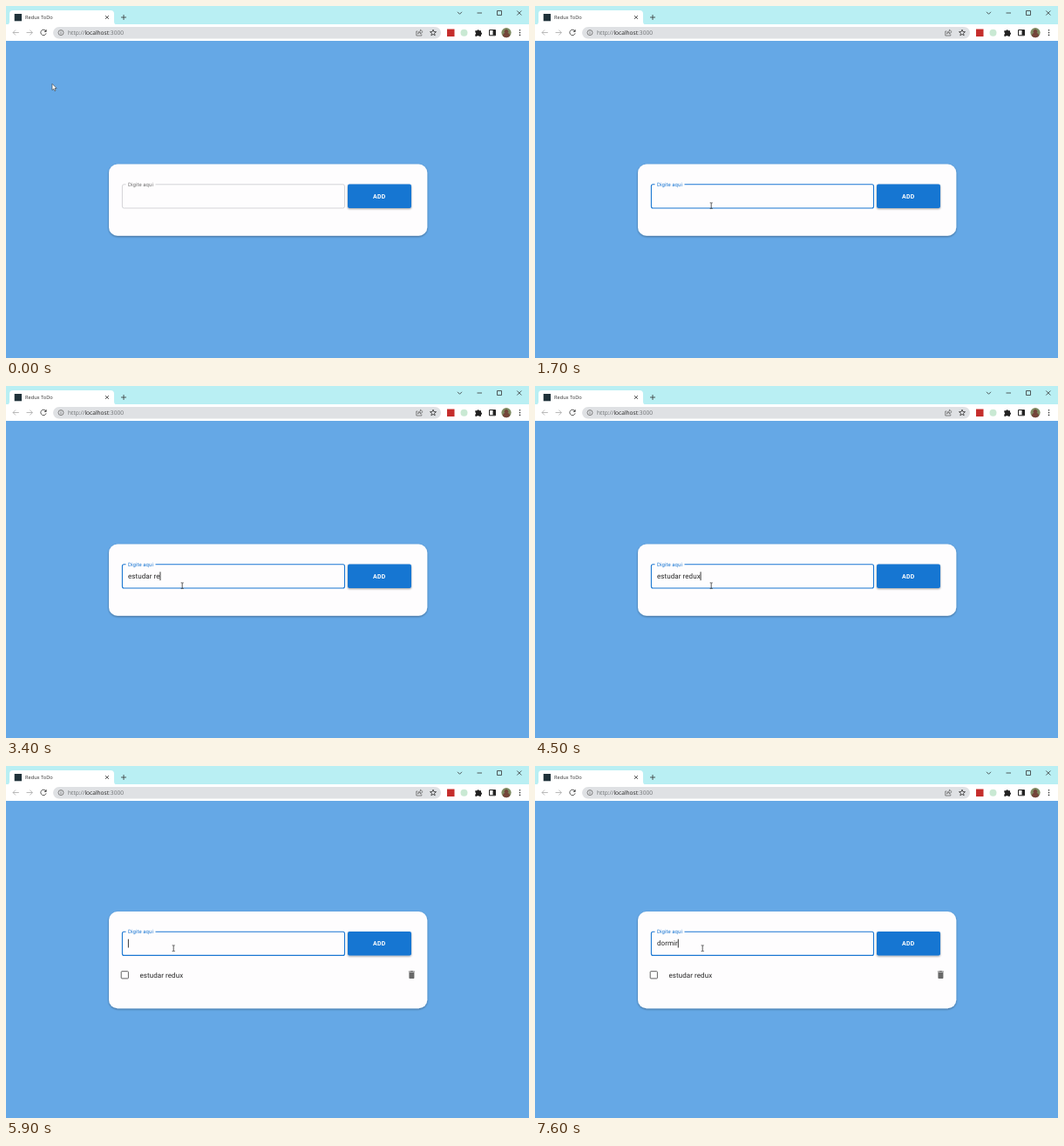
Recreate the animation shown at these times as an HTML page. Size 600 by 404 pixels, loop 8 s.

```html
<!DOCTYPE html>
<html lang="pt">
<head>
<meta charset="utf-8">
<title>Redux ToDo</title>
<style>
html, body { margin: 0; width: 100%; height: 100%; overflow: hidden; background: #65a8e6; }
svg { display: block; width: 600px; height: 404px; }
text { font-family: Roboto, sans-serif; white-space: pre; text-rendering: geometricPrecision; }
.ui { font-family: "Open Sans", sans-serif; }
.body { font-size: 8px; letter-spacing: .075px; fill: #252525; }
.line { fill: none; stroke: #333; stroke-width: .8; }
.soft { stroke: #666; }
</style>
</head>
<body>
<svg viewBox="0 0 600 404">
  <defs>
    <filter id="shade" x="-5%" y="-15%" width="110%" height="135%">
      <feDropShadow dx="0" dy="1" stdDeviation="1" flood-color="#000" flood-opacity=".38"/>
    </filter>
  </defs>
  <rect width="600" height="404" fill="#65a8e6"/>

  <!-- tab strip -->
  <rect width="600" height="22" fill="#b9eff3"/>
  <path d="M0 21.5Q4 21.5 4 18V9Q4 5 8 5H120Q124 5 124 9V18Q124 21.5 128 21.5Z" fill="#fff"/>
  <rect x="9.7" y="9" width="8.3" height="8.3" fill="#20323a"/>
  <text class="ui" x="22" y="15.3" font-size="5.67" fill="#333">Redux ToDo</text>
  <path class="line" d="M113.9 11l4 4m0-4l-4 4M132 13h6m-3-3v6" stroke-width="1"/>
  <path class="line" d="M518 6.8l2.5 2.5 2.5-2.5M540.5 8h5.5M563.5 5.5h5v5h-5zM586.3 5.5l5 5m0-5l-5 5"/>

  <!-- toolbar -->
  <rect y="21" width="600" height="19" fill="#fff"/>
  <path class="line" d="M14.8 30.5H8m3-3l-3 3 3 3M23.5 30.5h6.8m-3-3l3 3-3 3" style="stroke:#a9a9a9"/>
  <path class="line" d="M45.6 28.5a3.2 3.2 0 1 0 .5 2.8" stroke-width="1"/>
  <path d="M46.5 26.8v3h-3z" fill="#333"/>
  <rect x="54" y="24" width="445" height="13.6" rx="6.8" fill="#dfe1e4"/>
  <circle class="line soft" cx="63" cy="30.6" r="3"/>
  <path class="line soft" d="M63 30.2v2M63 28.8v.7"/>
  <text class="ui" x="71" y="33" font-size="6.62" fill="#6a6d70">http://<tspan fill="#222">localhost</tspan>:3000</text>
  <path class="line soft" d="M472.3 29h-1.5v5h6v-1.5M472.5 32q.3-3 3-3.2v-1.6l2.6 2.4-2.6 2.4v-1.6q-2 0-3 1.6" stroke-width=".7"/>
  <path class="line" id="star" stroke-width=".7"/>
  <rect x="506" y="26.5" width="8.5" height="8.5" fill="#c52e2c"/>
  <circle cx="525.5" cy="30.7" r="4" fill="#c9e9d3"/>
  <path d="M538.3 28.3h2a1.4 1.4 0 0 1 2.7 0h2v2a1.4 1.4 0 0 1 0 2.7v1.8h-2.4a1.2 1.2 0 0 0-2.3 0h-2v-2.2a1.2 1.2 0 0 0 0-2.3z" fill="#222"/>
  <path d="M554.5 27.5h7v6.3h-7z" fill="none" stroke="#222"/>
  <path d="M558.5 27.5h3v6h-3z" fill="#222"/>
  <circle cx="574" cy="30.6" r="5.6" fill="#7d8a60"/>
  <path d="M570 34.5q0-3.2 2.6-3.4a2.3 2.3 0 1 1 2.8 0q2.6.2 2.6 3.4a5.6 5.6 0 0 1-8 0z" fill="#74453a"/>
  <g fill="#333"><circle cx="589.5" cy="27.8" r=".8"/><circle cx="589.5" cy="30.6" r=".8"/><circle cx="589.5" cy="33.4" r=".8"/></g>

  <!-- app -->
  <rect id="card" x="118" width="365.3" rx="10" fill="#fefdfe" filter="url(#shade)"/>
  <g id="form">
    <path id="edge" fill="none" d="M171.5 204.8H386.5a2 2 0 0 1 2 2V230a2 2 0 0 1-2 2H135.4a2 2 0 0 1-2-2V206.8a2 2 0 0 1 2-2H137.5"/>
    <text id="label" x="140" y="206.6" font-size="6" letter-spacing=".056">Digite aqui</text>
    <text id="value" class="body" x="140" y="221"></text>
    <rect id="caret" y="213.3" width=".9" height="9.8" fill="#222"/>
    <rect x="392" y="204.6" width="73" height="27.4" rx="2" fill="#1976d2" filter="url(#shade)"/>
    <text x="421" y="220.6" font-size="7" font-weight="700" letter-spacing=".2" fill="#fff">ADD</text>
  </g>
  <g id="item">
    <rect x="132.2" y="235.7" width="8.2" height="8.2" rx=".8" fill="none" stroke="#626262"/>
    <text class="body" x="153.5" y="242.5">estudar redux</text>
    <path transform="translate(459.4 233.5) scale(.5)" fill="#696969" d="M6 19c0 1.1.9 2 2 2h8c1.1 0 2-.9 2-2V7H6zM19 4h-3.5l-1-1h-5l-1 1H5v2h14z"/>
  </g>
  <path id="arrow" d="M0 0V7.2L1.7 5.7 2.8 8.2 4 7.7 2.9 5.2H5.1Z" fill="#fff" stroke="#333" stroke-width=".6"/>
  <path id="beam" class="line" d="M-1.5-3.3H-.4L0-3 .4-3.3H1.5M0-3V3M-1.5 3.3H-.4L0 3 .4 3.3H1.5" stroke-width=".7"/>
</svg>
<script>
const LOOP = 8000, FOCUS = 1200, ADDED = 5000;
const $ = id => document.getElementById(id);
const show = (id, on) => $(id).setAttribute("visibility", on ? "visible" : "hidden");
const set = (id, attrs) => { for (const k in attrs) $(id).setAttribute(k, attrs[k]); };
const clamp = v => Math.max(0, Math.min(1, v));
const mix = (a, b, p) => a + (b - a) * p;

// [time, length typed]
const first = { word: "estudar redux", keys: [[2000, 1], [2200, 2], [2400, 3], [2500, 4], [2600, 5], [2700, 6],
  [2900, 7], [3000, 8], [3300, 9], [3400, 10], [4200, 11], [4500, 13]] };
const second = { word: "dormir", keys: [[6900, 1], [7100, 2], [7200, 3], [7300, 4], [7500, 5], [7600, 6]] };
const blink = [[0, 0], [FOCUS, 1], [1700, 0], [2000, 1], [3900, 0], [4200, 1], [ADDED, 0], [5100, 1], [5600, 0], [5900, 1], [6600, 0], [6900, 1]];

const at = (list, t) => list.reduce((v, [when, next]) => t >= when ? next : v, 0);

function pointer(t) {
  const a = clamp((t - 100) / 800), b = clamp((t - 5500) / 400);
  const p = a * a * (3 - 2 * a);
  return [mix(mix(53, 198.2, p), 188.2, b), mix(mix(89.3, 225.2, p), 205.2, b)];
}

function draw(now) {
  const t = Math.floor(now % LOOP / 100) * 100;
  const added = t >= ADDED, focused = t >= FOCUS;
  const shift = added ? -14.6 : 0;
  set("card", { y: added ? 167 : 181.6, height: added ? 111.2 : 82.2 });
  set("form", { transform: `translate(0 ${shift})` });
  show("item", added);

  const [x, y] = pointer(t), cx = x + 4, cy = y + 4;
  const over = cx > 133 && cx < 389 && cy > 204.5 + shift && cy < 232 + shift;
  set("edge", {
    stroke: focused ? "#1976d2" : over ? "#303030" : "#c2c2c6",
    "stroke-width": focused ? 1.1 : .7
  });
  const f = clamp((t - FOCUS + 100) / 300);
  set("label", { fill: `rgb(${mix(112, 25, f)},${mix(112, 118, f)},${mix(112, 210, f)})` });

  const { word, keys } = added ? second : first;
  $("value").textContent = word.slice(0, at(keys, t));
  const width = $("value").textContent ? $("value").getComputedTextLength() : 0;
  set("caret", { x: 139.9 + width });
  show("caret", at(blink, t));

  set("arrow", { transform: `translate(${x} ${y})` });
  set("beam", { transform: `translate(${cx} ${cy})` });
  show("arrow", !over);
  show("beam", over);
}

const points = Array.from({ length: 10 }, (_, i) => {
  const r = i % 2 ? 1.6 : 3.7, a = i * Math.PI / 5;
  return `${490 + r * Math.sin(a)} ${30.8 - r * Math.cos(a)}`;
});
set("star", { d: `M${points.join("L")}Z` });

function tick() {
  draw(performance.now());
  requestAnimationFrame(tick);
}
tick();
</script>
</body>
</html>
```
